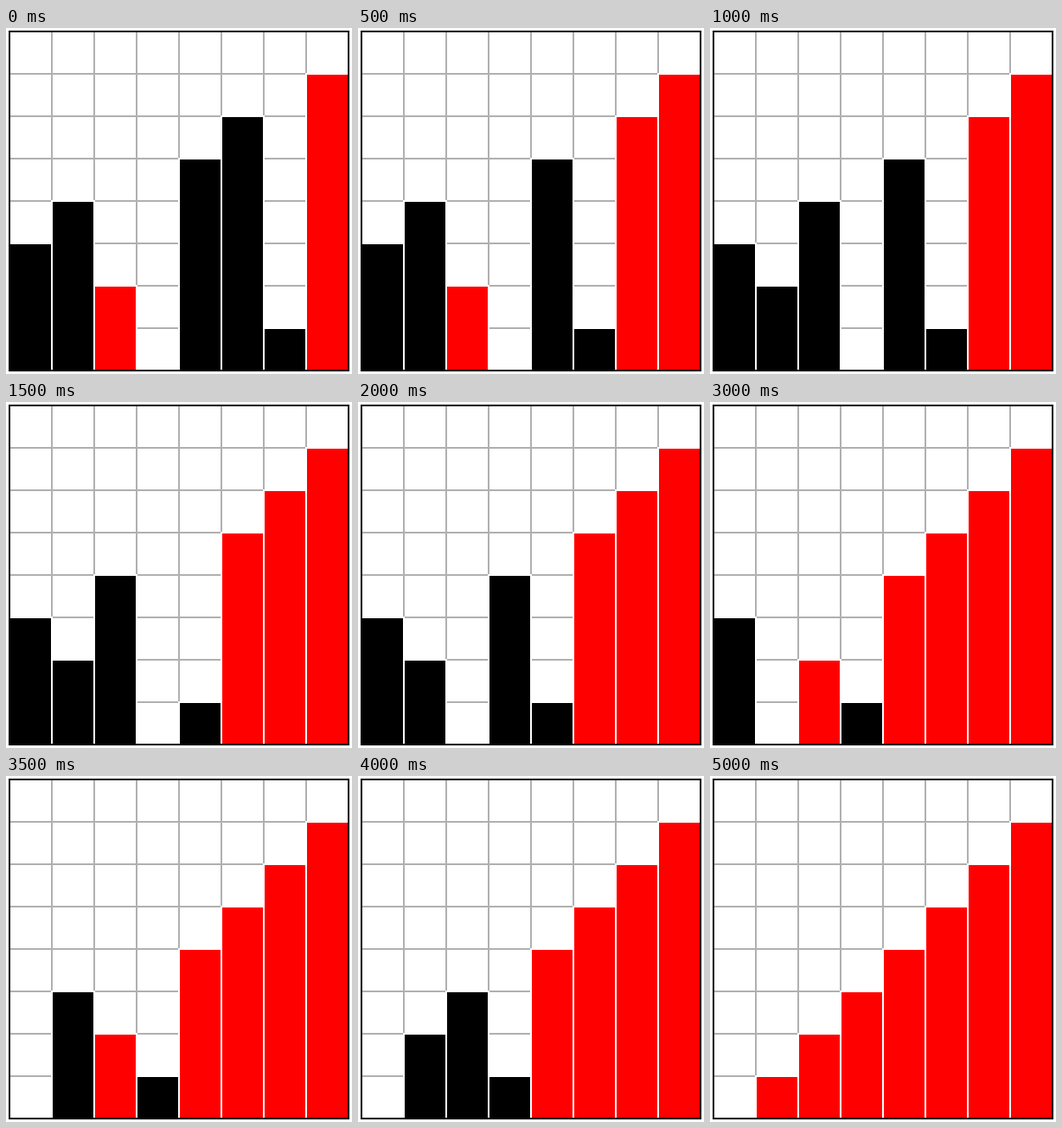
Write an HTML page with a canvas that moves like this. It is 400x400 px and loops after 5.5 s.

```html
<!DOCTYPE html>
<html lang="en">
<head>
<meta charset="utf-8">
<title>Sorting bars</title>
<style>
  html, body { margin: 0; width: 100%; height: 100%; overflow: hidden; background: #fff; }
  canvas { display: block; width: 400px; height: 400px; }
</style>
</head>
<body>
<canvas id="stage" width="400" height="400"></canvas>
<script>
const ctx = document.getElementById('stage').getContext('2d');
const STEP_MS = 500;
const CELL = 49, LEFT = 4, BOTTOM = 396, SIZE = 8 * CELL;
const START = [3, 4, 2, 0, 5, 6, 1, 7];
// Each swap exchanges column i with column i + 1.
const SWAPS = [5, 1, 4, 2, 3, 1, 0, 1, 2, 1];
const LOOP_MS = (SWAPS.length + 1) * STEP_MS;

function barsAt(step) {
  const bars = START.slice();
  for (const i of SWAPS.slice(0, step)) {
    [bars[i], bars[i + 1]] = [bars[i + 1], bars[i]];
  }
  return bars;
}

function drawGrid() {
  ctx.strokeStyle = '#b0b0b0';
  ctx.beginPath();
  for (let i = 1; i < 8; i++) {
    const p = LEFT + i * CELL;
    ctx.moveTo(p, LEFT);
    ctx.lineTo(p, BOTTOM);
    ctx.moveTo(LEFT, p);
    ctx.lineTo(BOTTOM, p);
  }
  ctx.stroke();
}

function drawBar(value, col) {
  if (!value) return;
  const rect = [LEFT + col * CELL, BOTTOM - value * CELL, CELL, value * CELL];
  ctx.fillStyle = value === col ? '#f00' : '#000';
  ctx.strokeStyle = '#fff';
  ctx.fillRect(...rect);
  ctx.strokeRect(...rect);
}

function draw(step) {
  ctx.fillStyle = '#fff';
  ctx.fillRect(0, 0, 400, 400);
  ctx.lineWidth = 2;
  drawGrid();
  barsAt(step).forEach(drawBar);
  ctx.strokeStyle = '#000';
  ctx.strokeRect(LEFT, LEFT, SIZE, SIZE);
}

function tick() {
  draw(Math.floor((performance.now() % LOOP_MS) / STEP_MS));
  requestAnimationFrame(tick);
}

tick();
</script>
</body>
</html>
```
